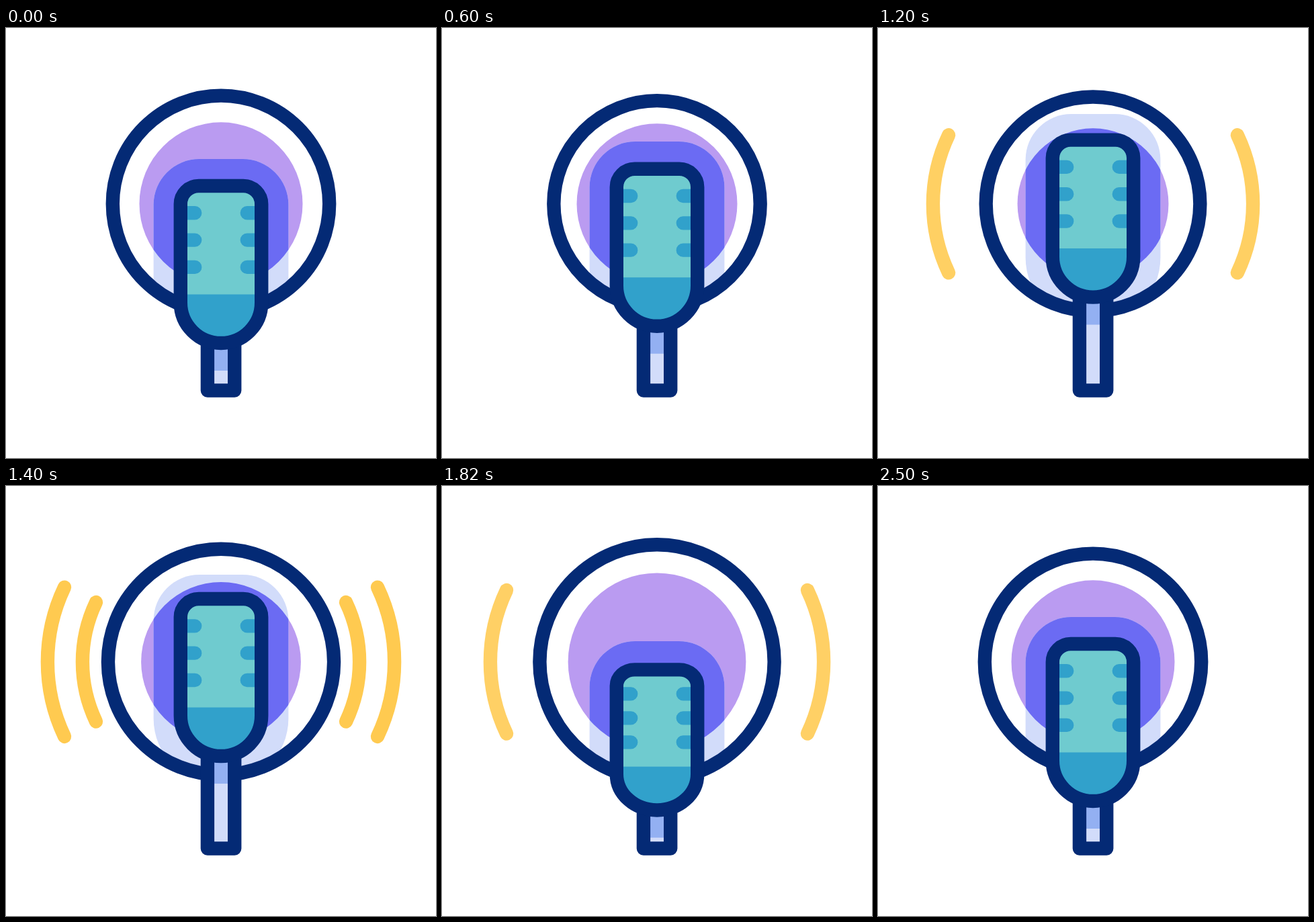
An HTML page with a canvas that plays this animation: 640x640 px, repeating every 3 s.

```html
<!DOCTYPE html>
<html lang="en">
<head>
<meta charset="utf-8">
<title>Microphone</title>
<style>
  html, body { margin: 0; width: 100%; height: 100%; overflow: hidden; background: #fff; }
  canvas { display: block; width: 100vw; height: 100vh; }
</style>
</head>
<body>
<canvas id="stage" width="640" height="640"></canvas>
<script>
const ctx = document.getElementById('stage').getContext('2d');
const LOOP = 3000, CX = 320, CY = 261.8, LINE = 20.4;
const WAVE_ANGLE = 25.5 * Math.PI / 180;
const C = {
  navy: '#042a75', purple: '#ba9bf1', violet: '#6b6bf3', pale: '#d2dcfa',
  sky: '#93b0f2', teal: '#6fcbcf', blue: '#31a1cb', yellow: '#ffca50'
};

// Keyframes: [time in ms, value], linear in between
const RING = [[220, 161.2], [925, 147.3], [1665, 179.6], [2240, 161.2]];
const DISC = [[480, 121.5], [1140, 110.5], [1840, 133], [2500, 121.5]];
const MIC = [[250, 0], [1355, -79.5], [1795, 40.5], [2290, 0]];
const HALO = [[220, 0], [1347, -77], [1790, 38.3], [2290, 0]];
const FLOOR = [[1795, 14.2], [2290, 0]];
const WAVES = [
  { r: [[1220, 188], [1840, 250]], alpha: [[1220, 0], [1300, 1], [1810, 1], [1900, 0]] },
  { r: [[1130, 231], [1820, 300]], alpha: [[1130, 0], [1210, 1], [1720, 1], [1815, 0]] }
];

function at(keys, t) {
  if (t <= keys[0][0]) return keys[0][1];
  for (let i = 1; i < keys.length; i++) {
    const [t0, v0] = keys[i - 1], [t1, v1] = keys[i];
    if (t < t1) return v0 + (v1 - v0) * (t - t0) / (t1 - t0);
  }
  return keys[keys.length - 1][1];
}

function circle(r) {
  const p = new Path2D();
  p.arc(CX, CY, r, 0, Math.PI * 2);
  return p;
}

// Rounded top with corner radius rc, elliptical bottom, squashed by k
function capsule(halfW, top, bottom, rc, k) {
  const p = new Path2D(), l = CX - halfW, r = CX + halfW;
  const shoulder = top + rc * k, waist = bottom - halfW * k;
  p.moveTo(l, waist);
  p.lineTo(l, shoulder);
  p.ellipse(l + rc, shoulder, rc, rc * k, 0, Math.PI, Math.PI * 1.5);
  p.ellipse(r - rc, shoulder, rc, rc * k, 0, Math.PI * 1.5, Math.PI * 2);
  p.lineTo(r, waist);
  p.ellipse(CX, waist, halfW, halfW * k, 0, 0, Math.PI);
  p.closePath();
  return p;
}

function fill(path, color) {
  ctx.fillStyle = color;
  ctx.fill(path);
}

function stroke(path, color) {
  ctx.strokeStyle = color;
  ctx.stroke(path);
}

function clipped(path, paint) {
  ctx.save();
  ctx.clip(path);
  paint();
  ctx.restore();
}

function drawWaves(t) {
  for (const w of WAVES) {
    const r = at(w.r, t);
    ctx.globalAlpha = t < w.alpha[0][0] ? 0 : at(w.alpha, t);
    for (const side of [0, Math.PI]) {
      const p = new Path2D();
      p.arc(CX, CY, r, side - WAVE_ANGLE, side + WAVE_ANGLE);
      stroke(p, C.yellow);
    }
  }
  ctx.globalAlpha = 1;
}

function drawBackdrop(t) {
  const ring = circle(at(RING, t)), disc = circle(at(DISC, t));
  const top = 195 + at(HALO, t);
  const halo = capsule(100.4, top, top + 314, 68, 1);
  fill(disc, C.purple);
  clipped(ring, () => {
    fill(halo, C.pale);
    clipped(halo, () => fill(disc, C.violet));
  });
  stroke(ring, C.navy);
}

function drawStem(bottom) {
  ctx.fillStyle = C.pale;
  ctx.fillRect(300, bottom - 20, 40, 559.5 - bottom);
  ctx.fillStyle = C.sky;
  ctx.fillRect(300, bottom - 20, 40, 61);
  stroke(new Path2D(`M299.9 ${bottom - 20}V539.5H340.2V${bottom - 20}`), C.navy);
}

function drawMic(t) {
  const drop = at(MIC, t);
  const top = 235 + drop;
  const bottom = 469 + Math.min(drop, at(FLOOR, t));
  const k = (bottom - top) / 234;
  const body = capsule(60.2, top, bottom, 27, k);

  drawStem(bottom);
  fill(body, C.teal);
  clipped(body, () => {
    ctx.fillStyle = C.blue;
    ctx.fillRect(250, top + 161.5 * k, 140, 200);
    for (let i = 1; i <= 3; i++) {
      const y = top + 40.3 * i * k;
      stroke(new Path2D(`M265 ${y}H281.2M375 ${y}H358.8`), C.blue);
    }
  });
  stroke(body, C.navy);
}

function draw(t) {
  ctx.fillStyle = '#fff';
  ctx.fillRect(0, 0, 640, 640);
  ctx.lineWidth = LINE;
  ctx.lineCap = ctx.lineJoin = 'round';
  drawWaves(t);
  drawBackdrop(t);
  drawMic(t);
}

const start = performance.now();
function tick() {
  draw((performance.now() - start) % LOOP);
  requestAnimationFrame(tick);
}
tick();
</script>
</body>
</html>
```
